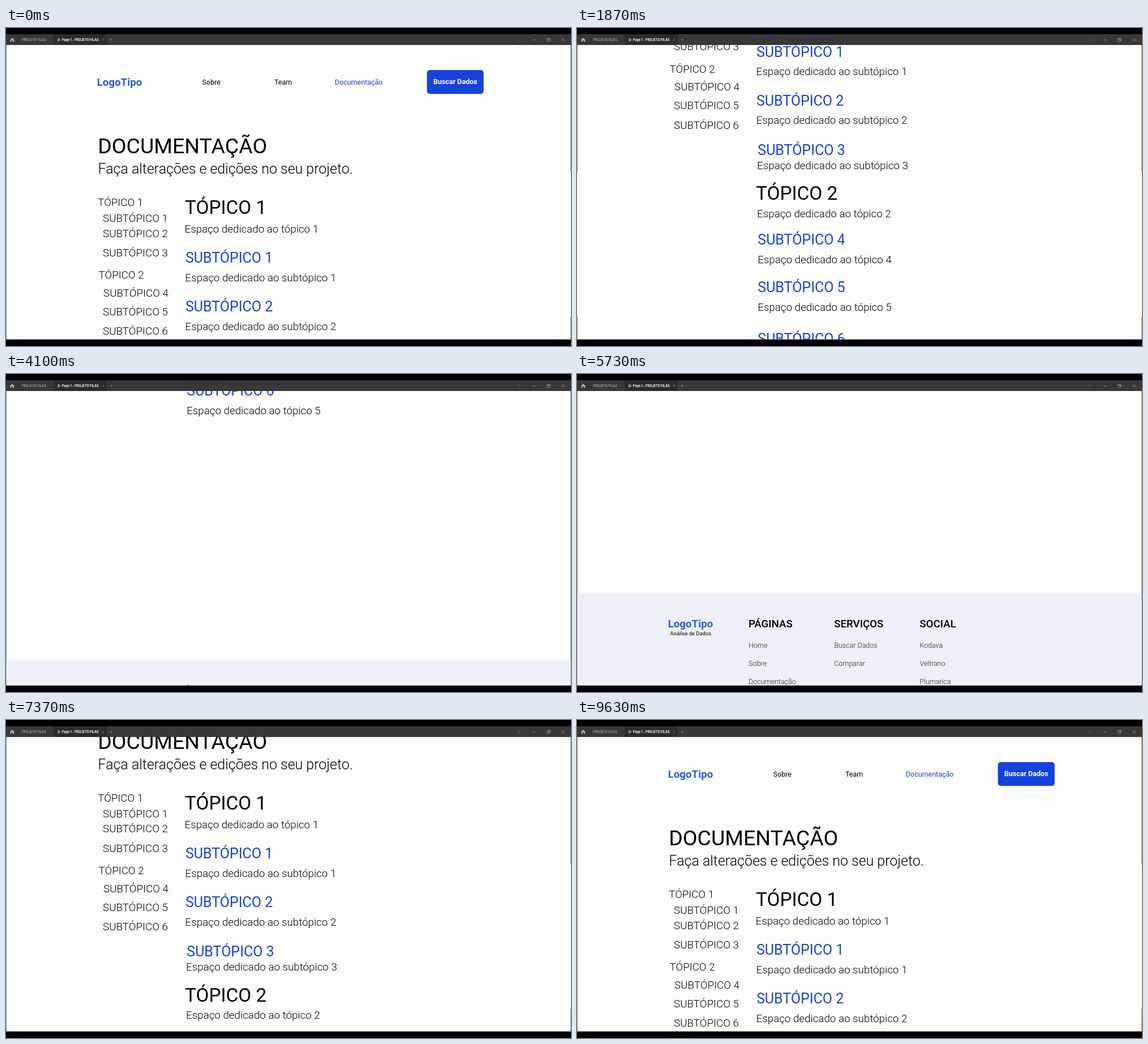
An HTML page for the animation above (9.66 s loop, 998 by 561 pixels).

```html
<!DOCTYPE html>
<html lang="pt">
<head>
<meta charset="utf-8">
<style>
  html, body { margin: 0; width: 100%; height: 100%; overflow: hidden; background: #000; }
  svg { display: block; width: 998px; height: 561px; font-family: Roboto, sans-serif; }
  .tab { font: 500 5.55px Inter, sans-serif; fill: #b4b4b4; }
  .active { font-weight: 700; font-size: 5.5px; fill: #fff; }
  .icon { fill: none; stroke: #a0a0a0; stroke-width: .8; }
  .logo { font-size: 18.71px; font-weight: 700; fill: #2b5be0; }
  .nav { font-size: 12.5px; }
  .blue { fill: #1743d6; }
  .title { font-size: 37.5px; }
  .lead { font-size: 24.95px; font-weight: 300; }
  .topic { font-size: 33.4px; }
  .sub { font-size: 25px; fill: #1743d6; }
  .body { font-size: 18.75px; font-weight: 300; }
  .head { font-size: 18.71px; font-weight: 500; }
  .small { font-size: 9.4px; }
  .link { font-size: 12.5px; font-weight: 300; fill: #222; }
  .button { font-size: 12.5px; font-weight: 700; fill: #fff; }
</style>
</head>
<body>
<svg viewBox="0 0 998 561">
  <clipPath id="view"><rect x="0.6" y="30" width="996.8" height="519.3"/></clipPath>
  <rect width="998" height="561"/>
  <rect y="11" width="998" height="539" fill="#38373a"/>
  <g clip-path="url(#view)">
    <rect y="30" width="998" height="520" fill="#fdfdfc"/>
    <g id="page">
      <rect y="1388" width="998" height="200" fill="#eff0f7"/>
      <rect x="743.5" y="74.2" width="100.2" height="42" rx="5" fill="#1442dc"/>
    </g>
  </g>
  <rect x="84" y="11" width="94" height="19" fill="#2c2c2e"/>
  <path d="M7.6 20.6 11 17.3l3.4 3.3v3.6h-2.3v-2.4H9.9v2.4H7.6z" fill="#b4b4b4"/>
  <text class="tab" x="28.3" y="22.8">PROJETO FILAS</text>
  <path class="icon" style="stroke:#fff" d="M92 18.4v5l4-2.5z"/>
  <text class="tab active" x="98.8" y="22.8">Page 1 - PROJETO FILAS</text>
  <path class="icon" stroke-opacity=".7" d="M169.7 19l3.4 3.4m0-3.4-3.4 3.4M183.5 20.7h5m-2.5-2.5v5M904.3 19.8l2.4 2.4 2.4-2.4"/>
  <path class="icon" d="M929.8 21h5.4M955.6 19.5h4v4h-4zM957 19.3V18h4.1v4.1h-1.3M981.7 18.2l5.2 5.2m0-5.2-5.2 5.2"/>
</svg>
<script>
const LOOP = 9660, NOTCH = 51.94, BOTTOM = 1001.3;
const page = document.getElementById('page');

function put(style, x, y, text) {
  const node = document.createElementNS(page.namespaceURI, 'text');
  node.setAttribute('class', style);
  node.setAttribute('x', x);
  node.setAttribute('y', y);
  node.textContent = text;
  page.append(node);
}

// Header
put('logo', 160.7, 101.8, 'LogoTipo');
put('nav', 346.6, 100.4, 'Sobre');
put('nav', 474, 100.4, 'Team');
put('nav blue', 580.8, 100.4, 'Documentação');
put('button', 754.8, 99.3, 'Buscar Dados');
put('title', 162.2, 220.9, 'DOCUMENTAÇÃO');
put('lead', 162.6, 257, 'Faça alterações e edições no seu projeto.');

// Side menu
put('body', 162.2, 314.4, 'TÓPICO 1');
put('body', 163.5, 442.2, 'TÓPICO 2');
[342.2, 368.6, 402.9, 473.9, 507, 541.3].forEach((y, i) =>
  put('body', i === 3 ? 172.1 : 171.1, y, `SUBTÓPICO ${i + 1}`));

// Sections: style, x, baseline, heading, text x, text baseline, text subject
[
  ['topic', 316, 328, 'TÓPICO 1', 315.5, 361.4, 'tópico 1'],
  ['sub', 316.9, 414.3, 'SUBTÓPICO 1', 316.6, 447, 'subtópico 1'],
  ['sub', 316.9, 500.4, 'SUBTÓPICO 2', 316.6, 533, 'subtópico 2'],
  ['sub', 319.3, 587.4, 'SUBTÓPICO 3', 318.1, 612.6, 'subtópico 3'],
  ['topic', 316, 667, 'TÓPICO 2', 318.1, 697.1, 'tópico 2'],
  ['sub', 319.3, 745.3, 'SUBTÓPICO 4', 319.2, 778.1, 'tópico 4'],
  ['sub', 319.3, 829.9, 'SUBTÓPICO 5', 319.2, 862.7, 'tópico 5'],
  ['sub', 319.3, 920.8, 'SUBTÓPICO 6', 319.2, 953.6, 'tópico 5']
].forEach(([style, x, y, heading, textX, textY, subject]) => {
  put(style, x, y, heading);
  put('body', textX, textY, `Espaço dedicado ao ${subject}`);
});

// Footer
put('logo', 160.7, 1448.4, 'LogoTipo');
put('small', 164.6, 1462.2, 'Análise de Dados');
[
  [303, 'PÁGINAS', 'Home', 'Sobre', 'Documentação'],
  [454.2, 'SERVIÇOS', 'Buscar Dados', 'Comparar'],
  [605.2, 'SOCIAL', 'Kodava', 'Veltrano', 'Plumarica']
].forEach(([x, heading, ...links]) => {
  put('head', x, 1448.4, heading);
  links.forEach((label, i) => put('link', x, 1484.5 + i * 31.8, label));
});

// Wheel notches turned by time t, starting at a given moment
const notches = (t, start, every, most) =>
  Math.max(0, Math.min(most, Math.floor((t - start) / every) + 1));

function scrollAt(t) {
  const down = Math.min(BOTTOM, NOTCH * notches(t, 400, 223, 20));
  const up = notches(t, 5910, 97, 17) + notches(t, 8020, 100, 3);
  return Math.max(0, down - NOTCH * up);
}

function draw() {
  const t = performance.now() % LOOP;
  page.setAttribute('transform', `translate(0 ${-scrollAt(t)})`);
  requestAnimationFrame(draw);
}
draw();
</script>
</body>
</html>
```
